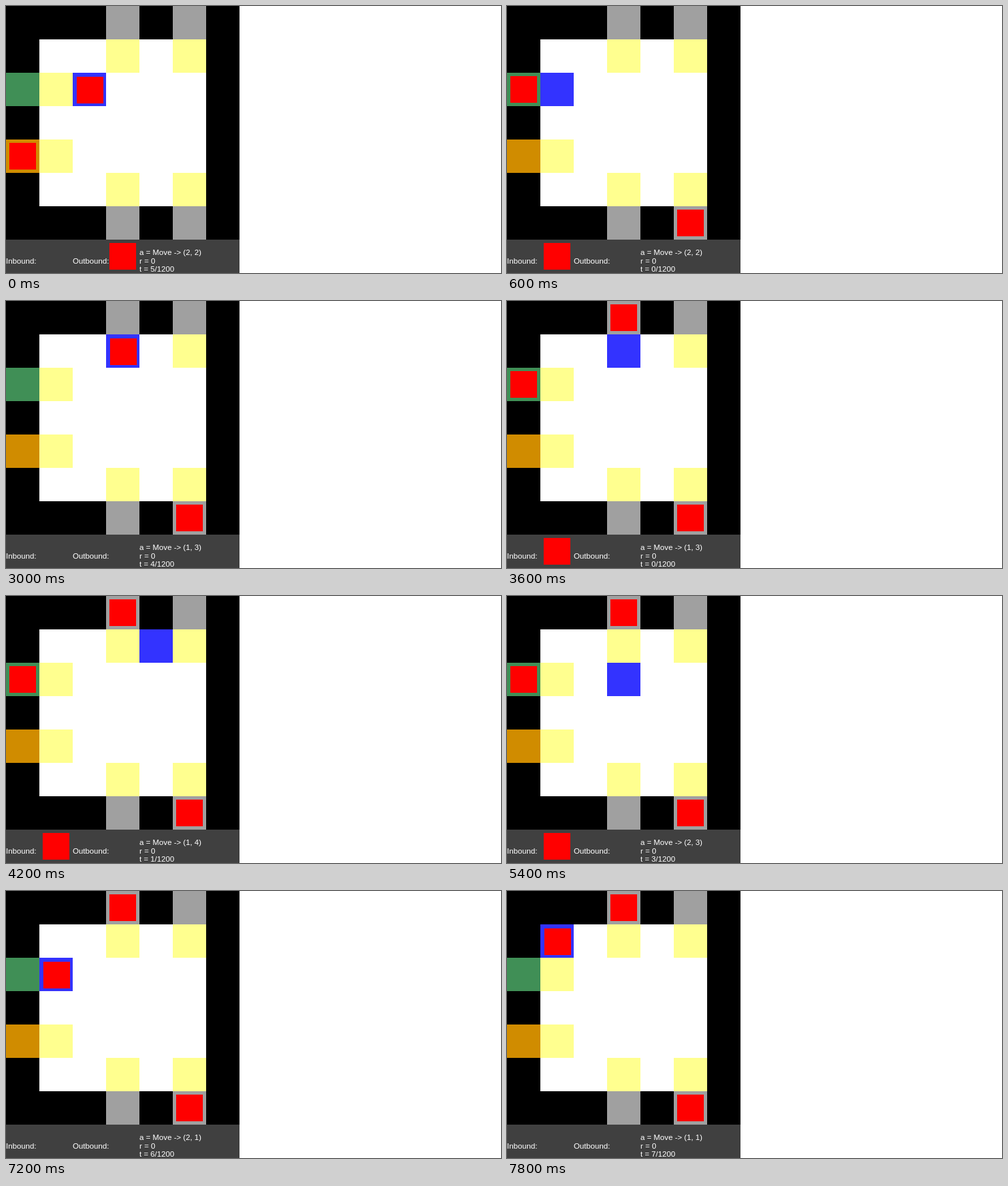
An HTML page that plays this animation: 742x400 px, repeating every 8000 ms.

```html
<!DOCTYPE html>
<html lang="en">
<head>
<meta charset="utf-8">
<title>Warehouse grid</title>
<style>
  html, body { margin: 0; width: 100%; height: 100%; overflow: hidden; background: #fff; }
  svg { display: block; }
  text { font: 11.7px "Liberation Sans", Arial, sans-serif; fill: #fff; white-space: pre; }
</style>
</head>
<body>
<svg id="stage" width="742" height="400" viewBox="0 0 742 400" shape-rendering="crispEdges"></svg>
<script>
const CELL = 50, STEP = 600, LOOP = 8000;
const RED = '#f00', GREY = '#a0a0a0', YELLOW = '#ffff8f';
const stage = document.getElementById('stage');

function add(tag, attrs, parent = stage) {
  const el = document.createElementNS('http://www.w3.org/2000/svg', tag);
  for (const key in attrs) el.setAttribute(key, attrs[key]);
  return parent.appendChild(el);
}
const rect = (x, y, width, height, fill, parent) => add('rect', { x, y, width, height, fill }, parent);
const cell = (row, col, fill) => rect(col * CELL, row * CELL, CELL, CELL, fill);
const box = (x, y, parent) => rect(x, y, 40, 40, RED, parent);
function label(x, y, content = '') {
  const el = add('text', { x, y });
  el.textContent = content;
  return el;
}

// Room, pads and doors
rect(0, 0, 350, 350, '#000');
rect(50, 50, 250, 250, '#fff');
for (const col of [3, 5]) {
  cell(0, col, GREY);
  cell(1, col, YELLOW);
  cell(5, col, YELLOW);
  cell(6, col, GREY);
}
cell(2, 0, '#408f56');
cell(2, 1, YELLOW);
cell(4, 0, '#d08c00');
cell(4, 1, YELLOW);
rect(0, 350, 350, 50, '#404040');

const boxes = {
  entry: box(5, 105),
  exit: box(5, 205),
  top: box(155, 5),
  bottom: box(255, 305),
  inbound: box(55, 355),
  outbound: box(155, 355)
};

const agent = add('g', {});
rect(0, 0, CELL, CELL, '#33f', agent);
boxes.load = box(6, 6, agent);

label(0, 386, 'Inbound:');
label(100, 386, 'Outbound:');
const action = label(200, 373);
label(200, 386, 'r = 0');
const clock = label(200, 398);

const CARGO = {
  ship: 'exit outbound load',
  arrive: 'entry inbound bottom',
  carry: 'bottom load',
  stored: 'entry inbound bottom top',
  fetch: 'bottom top load'
};

// Row, column, tick, cargo, and the last move target when it differs
const STEPS = [
  [2, 2, 5, 'ship'],
  [2, 1, 0, 'arrive', '2, 2'],
  [2, 1, 1, 'carry', '2, 2'],
  [1, 1, 2, 'carry'],
  [1, 2, 3, 'carry'],
  [1, 3, 4, 'carry'],
  [1, 3, 0, 'stored'],
  [1, 4, 1, 'stored'],
  [2, 4, 2, 'stored'],
  [2, 3, 3, 'stored'],
  [2, 2, 4, 'stored'],
  [2, 1, 5, 'stored'],
  [2, 1, 6, 'fetch'],
  [1, 1, 7, 'fetch']
];

let shown = -1;
function show(index) {
  if (index === shown) return;
  shown = index;
  const [row, col, tick, cargo, target = `${row}, ${col}`] = STEPS[index];
  agent.setAttribute('transform', `translate(${col * CELL} ${row * CELL})`);
  const visible = CARGO[cargo].split(' ');
  for (const name in boxes) {
    boxes[name].setAttribute('visibility', visible.includes(name) ? 'visible' : 'hidden');
  }
  action.textContent = `a = Move -> (${target})`;
  clock.textContent = `t = ${tick}/1200`;
}

const start = performance.now();
function frame() {
  show(Math.floor((performance.now() - start) % LOOP / STEP));
  requestAnimationFrame(frame);
}
frame();
</script>
</body>
</html>
```
